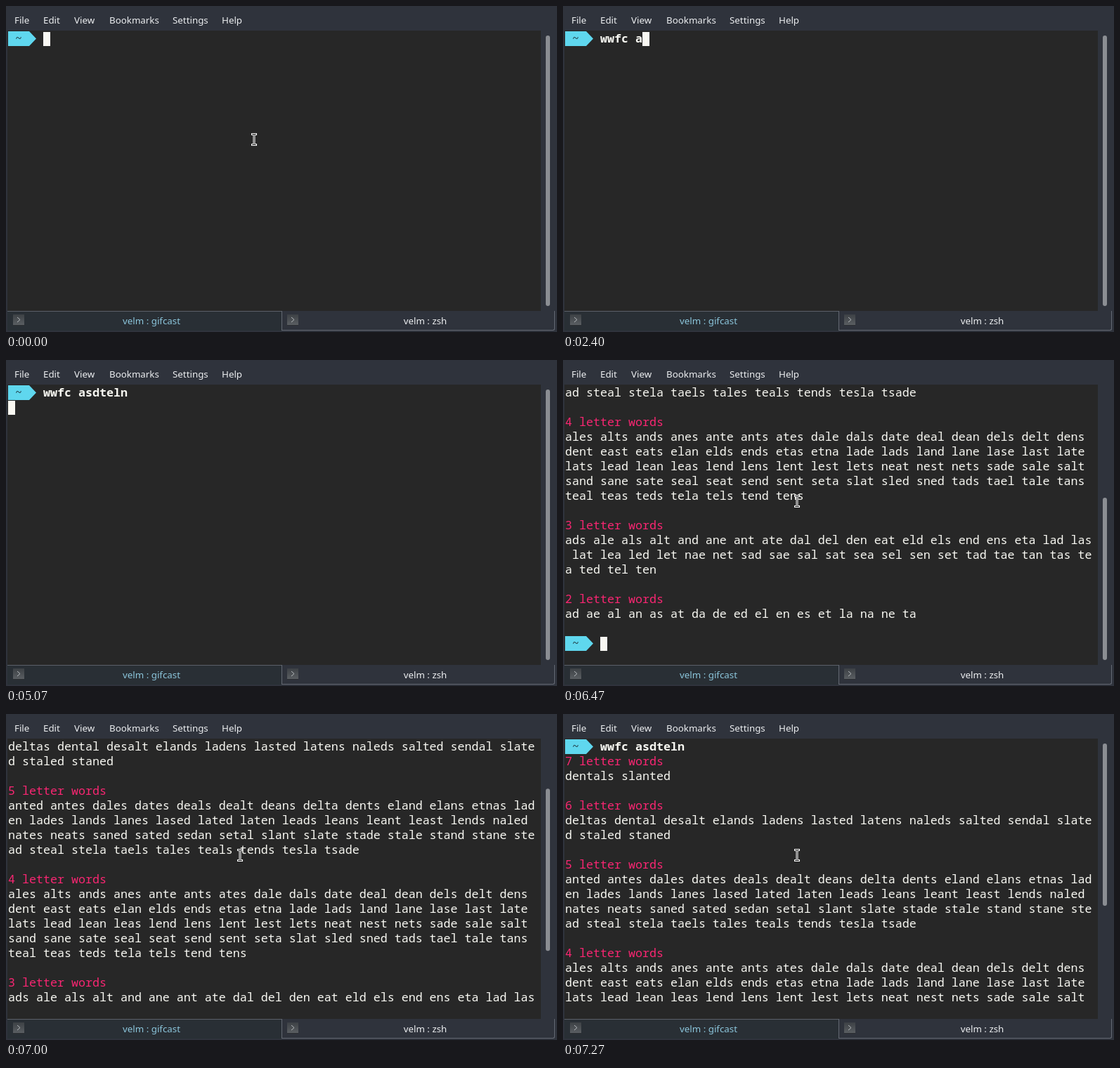
Animation, 784 px wide and 464 px high, one loop 8000 ms. Source, as an HTML page:

```html
<!DOCTYPE html>
<html lang="en">
<head>
<meta charset="utf-8">
<title>Word finder in a terminal</title>
<style>
@property --top { syntax: "<number>"; inherits: true; initial-value: 0; }
@property --typed { syntax: "<number>"; inherits: true; initial-value: 0; }
@property --col { syntax: "<number>"; inherits: true; initial-value: 5; }
@property --row { syntax: "<number>"; inherits: true; initial-value: 0; }
@property --out { syntax: "<number>"; inherits: true; initial-value: 0; }
@property --mouse { syntax: "<number>"; inherits: true; initial-value: 1; }
@property --mx { syntax: "<length>"; inherits: true; initial-value: 353px; }
@property --my { syntax: "<length>"; inherits: true; initial-value: 190px; }
@property --thumb { syntax: "<length>"; inherits: true; initial-value: 385px; }

html, body { margin: 0; width: 100%; height: 100%; overflow: hidden; background: #2f333c; }
#stage {
  position: relative; width: 784px; height: 464px; overflow: hidden;
  background: #2f333c; color: #eceef0;
  font: 13.333px/20px "Noto Sans", sans-serif;
  animation: session 8s step-end infinite;
}
#stage div, #stage span.abs, svg { position: absolute; }
.menu span { position: absolute; top: 10px; white-space: pre; }

.term { left: 2px; top: 35px; width: 759px; height: 399px; background: #272727; }
.view { left: 3px; top: 36px; width: 758px; height: 378px; overflow: hidden; }
.page {
  left: 0; top: 0; width: 758px; height: 630px; color: #f8f8f2;
  font: 500 16.667px/21px "Noto Sans Mono", "DejaVu Sans Mono", monospace;
  transform: translateY(calc(var(--top) * -21px));
}
.page pre { position: absolute; margin: 0; font: inherit; }
.page b { font-weight: inherit; color: #f92672; }
.prompt {
  left: 0; width: 40px; height: 21px; background: #5fd7ee; color: #24424b;
  clip-path: polygon(0 0, 30px 0, 100% 50%, 30px 100%, 0 100%);
}
.prompt pre { left: 10px; top: -1px; }
#stage .page .cmd {
  left: 50px; top: -1px; height: 22px; overflow: hidden; font-weight: 600;
  width: calc(var(--typed) * 10px);
}
.out { left: 0; top: 21px; opacity: var(--out); }
.out pre { top: -1px; }
.block {
  left: 0; top: 1px; width: 10px; height: 20px; background: #f9f8f2;
  transform: translate(calc(var(--col) * 10px), calc(var(--row) * 21px));
}
.bar {
  left: 768px; top: 42px; width: 6px; height: var(--thumb);
  border-radius: 3px; background: #8b8e93;
  transform: translateY(calc(var(--top) * 12.833px));
}

.tab { box-sizing: border-box; text-align: center; line-height: 27px; }
.tab.idle { left: 2px; top: 434px; width: 391px; height: 28px; background: #292f35;
  border-top: 1px solid #5b6069; color: #8cc6dc; }
.tab.live { left: 392px; top: 434px; width: 389px; height: 28px; line-height: 28px;
  border: solid #646973; border-width: 0 1px 1px; border-radius: 0 0 3px 0; }
.tab span { position: absolute; left: 0; right: 0; top: 0; }
.tab.idle span { left: 19px; }
.tab.live span { left: 20px; }
.icon { top: 439px; }
.mouse {
  left: -5px; top: -9px; opacity: var(--mouse);
  transform: translate(var(--mx), var(--my));
}

@keyframes session {
  0% { --typed: 0; --col: 5; --row: 0; --top: 0; --out: 0; --thumb: 385px;
       --mouse: 1; --mx: 353px; --my: 190px; }
  /* typing */
  7.4% { --typed: 1; --col: 6; --mouse: 0; }
  8.3% { --typed: 2; --col: 7; }
  16.5% { --typed: 3; --col: 8; }
  19% { --typed: 4; --col: 9; }
  20.8% { --typed: 5; --col: 10; }
  29.9% { --typed: 6; --col: 11; }
  36.5% { --typed: 7; --col: 12; }
  39% { --typed: 8; --col: 13; }
  43.3% { --typed: 9; --col: 14; }
  46.5% { --typed: 10; --col: 15; }
  49.9% { --typed: 11; --col: 16; }
  52.4% { --typed: 12; --col: 17; }
  /* enter, then output */
  63.3% { --col: 0; --row: 1; }
  68.3% { --col: 5; --row: 29; --out: 1; --top: 12; --thumb: 231px; }
  /* pointer returns */
  78.3% { --mouse: 1; --mx: 344px; --my: 195px; }
  79% { --mx: 340px; --my: 197px; }
  79.9% { --mx: 336px; --my: 199px; }
  80.8% { --mx: 333px; --my: 201px; }
  /* scroll back */
  85.8% { --top: 11; }
  86.5% { --top: 8; }
  87.4% { --top: 5; }
  88.3% { --top: 3; }
  89% { --top: 2; }
  89.9% { --top: 1; }
  90.8% { --top: 0; }
  100% { --typed: 12; --col: 5; --row: 29; --top: 0; --out: 1; --thumb: 231px;
         --mouse: 1; --mx: 333px; --my: 201px; }
}
</style>
</head>
<body>
<div id="stage">
  <div class="menu">
    <span style="left:12px">File</span>
    <span style="left:53px">Edit</span>
    <span style="left:97px">View</span>
    <span style="left:147px">Bookmarks</span>
    <span style="left:237px">Settings</span>
    <span style="left:307px">Help</span>
  </div>

  <div class="term"></div>
  <div class="view"><div class="page">
    <div class="prompt" style="top:0"><pre>~</pre></div>
    <pre class="cmd">wwfc asdteln</pre>
    <div class="out">
<pre><b>7 letter words</b>
dentals slanted

<b>6 letter words</b>
deltas dental desalt elands ladens lasted latens naleds salted sendal slate
d staled staned

<b>5 letter words</b>
anted antes dales dates deals dealt deans delta dents eland elans etnas lad
en lades lands lanes lased lated laten leads leans leant least lends naled
nates neats saned sated sedan setal slant slate stade stale stand stane ste
ad steal stela taels tales teals tends tesla tsade

<b>4 letter words</b>
ales alts ands anes ante ants ates dale dals date deal dean dels delt dens
dent east eats elan elds ends etas etna lade lads land lane lase last late
lats lead lean leas lend lens lent lest lets neat nest nets sade sale salt
sand sane sate seal seat send sent seta slat sled sned tads tael tale tans
teal teas teds tela tels tend tens

<b>3 letter words</b>
ads ale als alt and ane ant ate dal del den eat eld els end ens eta lad las
 lat lea led let nae net sad sae sal sat sea sel sen set tad tae tan tas te
a ted tel ten

<b>2 letter words</b>
ad ae al an as at da de ed el en es et la na ne ta
</pre>
      <div class="prompt" style="top:588px"><pre>~</pre></div>
    </div>
    <div class="block"></div>
  </div></div>
  <div class="bar"></div>

  <div class="tab idle"><span>velm : gifcast</span></div>
  <div class="tab live"><span>velm : zsh</span></div>
  <svg width="0" height="0">
    <linearGradient id="shade" x2="0" y2="1">
      <stop stop-color="#3d4145"/><stop offset="1" stop-color="#5c6064"/>
    </linearGradient>
    <symbol id="shell" viewBox="0 0 16 16">
      <path d="M0 0H16V16H0Z" fill="url(#shade)"/>
      <path d="M0 15.5H16" stroke="#2a2d31"/>
      <path d="M6 4L10 7.5L6 11" fill="none" stroke="#b4b8bb"/>
    </symbol>
  </svg>
  <svg class="icon" style="left:10px" width="16" height="16"><use href="#shell"/></svg>
  <svg class="icon" style="left:400px" width="16" height="16"><use href="#shell"/></svg>

  <svg class="mouse" width="10" height="18" fill="none">
    <path d="M1 1.5H9M1 16.5H9M5 1.5V16.5" stroke="#fff" stroke-width="3"/>
    <path d="M2 1.5H8M2 16.5H8M5 1.5V16.5" stroke="#222" stroke-width="1"/>
  </svg>
</div>
</body>
</html>
```
